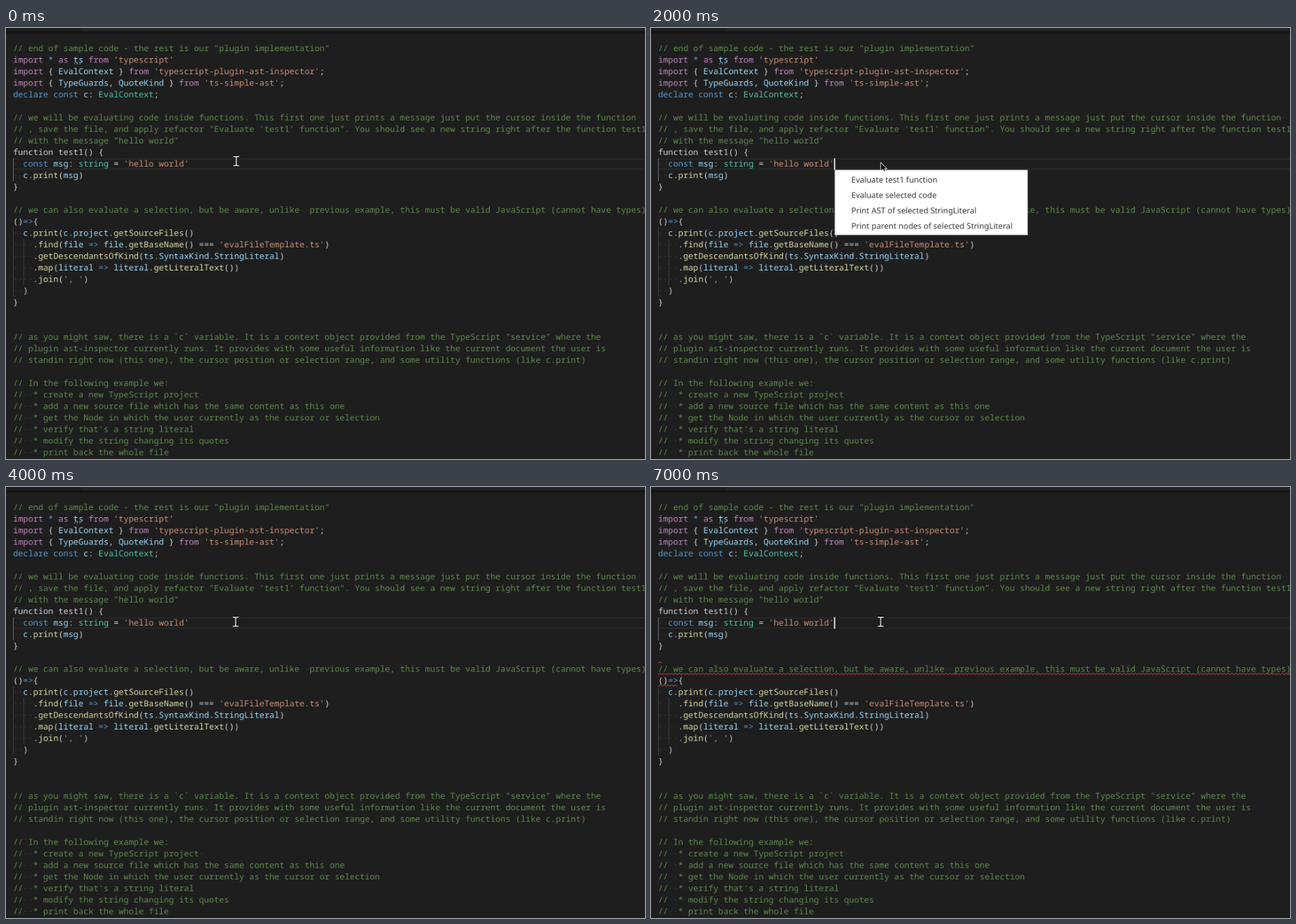
An HTML page with a canvas for the animation above (8 s loop, 910 by 615 pixels).

```html
<!DOCTYPE html>
<html lang="en">
<head>
<meta charset="utf-8">
<title>Evaluating code in the editor</title>
<style>
  html, body { margin: 0; width: 100%; height: 100%; overflow: hidden; background: #1e1e1e; }
  canvas { display: block; }
</style>
</head>
<body>
<canvas id="stage" width="910" height="615"></canvas>
<script>
// The screen is laid out at its natural size, then shrunk onto the stage.
const stage = document.getElementById('stage');
const view = stage.getContext('2d');
const screen = document.createElement('canvas');
const W = screen.width = 992, H = screen.height = 672;
const ctx = screen.getContext('2d');

const LOOP = 8000;
const LEFT = 11, TOP = 23, COL = 7.8, ROW = 18, BASELINE = 13;
const CODE_FONT = '13px "Noto Sans Mono", "DejaVu Sans Mono", monospace';
const MENU_FONT = '12.45px "Noto Sans", "Open Sans", sans-serif';

const code = `// end of sample code - the rest is our "plugin implementation"
import * as ts from 'typescript'
import { EvalContext } from 'typescript-plugin-ast-inspector';
import { TypeGuards, QuoteKind } from 'ts-simple-ast';
declare const c: EvalContext;

// we will be evaluating code inside functions. This first one just prints a message just put the cursor inside the function\x20
// , save the file, and apply refactor "Evaluate 'test1' function". You should see a new string right after the function test1
// with the message "hello world"
function test1() {
  const msg: string = 'hello world'
  c.print(msg)
}

// we can also evaluate a selection, but be aware, unlike  previous example, this must be valid JavaScript (cannot have types)
()=>{
  c.print(c.project.getSourceFiles()
    .find(file => file.getBaseName() === 'evalFileTemplate.ts')
    .getDescendantsOfKind(ts.SyntaxKind.StringLiteral)
    .map(literal => literal.getLiteralText())
    .join(', ')
  )
}


// as you might saw, there is a \`c\` variable. It is a context object provided from the TypeScript "service" where the
// plugin ast-inspector currently runs. It provides with some useful information like the current document the user is
// standin right now (this one), the cursor position or selection range, and some utility functions (like c.print)

// In the following example we:
//  * create a new TypeScript project\x20
//  * add a new source file which has the same content as this one
//  * get the Node in which the user currently as the cursor or selection
//  * verify that's a string literal
//  * modify the string changing its quotes
//  * print back the whole file`.split('\n');

const output = ['var __output = `', 'Output:', 'hello world', '', '`'];
const menuItems = [
  'Evaluate test1 function',
  'Evaluate selected code',
  'Print AST of selected StringLiteral',
  'Print parent nodes of selected StringLiteral'
];

const colors = {
  comment: '#608b4e', string: '#ce9178', type: '#4ec9b0', control: '#c586c0',
  keyword: '#569cd6', plain: '#d4d4d4', method: '#dcdcaa', name: '#9cdcfe', rest: '#d4d4d4'
};
const syntax = new RegExp([
  '(?<comment>^//.*)', "(?<string>'[^']*'|`)", '(?<type>(?<=: )\\w+)',
  '(?<control>\\b(?:import|from|as)\\b)', '(?<keyword>\\b(?:const|declare|var)\\b|=>|\\*)',
  '(?<plain>^function.*)', '(?<method>\\w+(?=\\())', '(?<name>\\w+)', '(?<rest>[^\\s\\w])'
].join('|'), 'g');

const xAt = col => LEFT + col * COL;
const yAt = row => TOP + row * ROW;

function rect(x, y, w, h, color) {
  ctx.fillStyle = color;
  ctx.fillRect(x, y, w, h);
}

// Words sit on the character grid.
function words(text, col, row, color) {
  ctx.fillStyle = color;
  for (const m of text.matchAll(/\S+/g)) ctx.fillText(m[0], xAt(col + m.index), yAt(row) + BASELINE);
}

function codeLine(text, row) {
  for (const m of text.matchAll(syntax)) {
    const kind = Object.keys(m.groups).find(k => m.groups[k] !== undefined);
    words(m[0], m.index, row, colors[kind]);
  }
  for (const m of text.matchAll(/^ +| {2,}| +$/g))
    for (let i = 0; i < m[0].length; i++)
      rect(xAt(m.index + i + 0.5) - 0.75, yAt(row) + 8, 1.5, 1.5, 'rgba(227,228,226,.16)');
}

function guide(col, from, to, color) {
  rect(Math.round(xAt(col)), yAt(from), 1, (to - from) * ROW, color);
}

function squiggle(row, cols) {
  const end = Math.min(W, xAt(cols)), y = yAt(row + 1) - 1.5;
  ctx.beginPath();
  for (let x = LEFT, i = 0; x <= end; x += 3, i++) ctx.lineTo(x, y + (i % 2 ? -1.1 : 1.1));
  ctx.strokeStyle = '#e04444';
  ctx.lineWidth = 1;
  ctx.stroke();
}

function frameTop() {
  rect(117, 0, W - 117, 5, '#252526');
  const shade = ctx.createLinearGradient(0, 5, 0, 11);
  shade.addColorStop(0, 'rgba(0,0,0,.45)');
  shade.addColorStop(1, 'rgba(0,0,0,0)');
  rect(0, 5, W, 6, shade);
}

function editor(s) {
  rect(0, 0, W, H, '#1e1e1e');
  frameTop();
  rect(LEFT, yAt(10), W, 2, '#282828');
  rect(LEFT, yAt(11) - 2, W, 2, '#282828');

  const shift = s.output ? output.length : 0;
  guide(0, 10, 12, '#707070');
  guide(0, 16 + shift, 22 + shift, '#404040');
  guide(2, 17 + shift, 21 + shift, '#404040');

  ctx.font = CODE_FONT;
  code.forEach((text, i) => codeLine(text, i > 12 ? i + shift : i));
  if (s.output) output.forEach((text, i) => {
    if (i === 1 || i === 2) words(text, 0, 13 + i, colors.string);
    else codeLine(text, 13 + i);
  });

  for (let i = 0; i < 3; i++) rect(106 + i * 4, 55, 1.5, 1.5, '#b4b4b4');
  if (s.errors) {
    squiggle(13, 1);
    squiggle(14, 126);
    squiggle(15, 4);
  }
  if (s.caret) rect(xAt(35), yAt(10), 2, ROW, '#e8e8e8');
}

function menu(active) {
  const x = 285, y = 221, w = 300, h = 102, item = 24;
  rect(x, y, w, h, '#b9bbbc');
  rect(x + 1, y + 1, w - 2, h - 2, '#ffffff');
  if (active >= 0) rect(x + 1, y + 3 + active * item, w - 2, item, '#16a085');
  ctx.font = MENU_FONT;
  menuItems.forEach((text, i) => {
    ctx.fillStyle = i === active ? '#ffffff' : '#31363b';
    ctx.fillText(text, x + 26, y + 20 + i * item);
  });
}

function outline(path, color, width) {
  ctx.strokeStyle = color;
  ctx.lineWidth = width;
  ctx.stroke(path);
}

const beam = new Path2D('M-4.5-7h3q1.5 0 1.5 1.5q0-1.5 1.5-1.5h3M0-5.5V5.5M-4.5 7h3q1.5 0 1.5-1.5q0 1.5 1.5 1.5h3');
const arrow = new Path2D('M0 0V13.5L3.5 10.7L5.5 14.5L7.6 13.5L5.8 9.8H9.8Z');

function pointer(x, y, isArrow) {
  ctx.save();
  ctx.translate(x, y);
  if (isArrow) {
    ctx.fillStyle = '#000';
    ctx.fill(arrow);
    outline(arrow, '#fff', 1);
  } else {
    outline(beam, '#000', 3.5);
    outline(beam, '#fff', 1.6);
  }
  ctx.restore();
}

// Each state holds until the next one begins.
const states = [
  { at: 0, mouse: [357.5, 207.5] },
  { at: 1000, mouse: [355.5, 209.5] },
  { at: 2000, mouse: [356.5, 209.5], menu: -1 },
  { at: 3000, mouse: [356.5, 209.5], menu: 0 },
  { at: 4000, mouse: [356.5, 210] },
  { at: 6000, mouse: [356.5, 210], output: true },
  { at: 7000, mouse: [356.5, 210], errors: true }
];
for (const s of states) s.caret = (s.at >= 1000 && s.at < 4000) || s.at >= 7000;

ctx.textRendering = 'geometricPrecision';
const start = performance.now();
let shown;

function draw() {
  const t = Math.max(0, performance.now() - start) % LOOP;
  const s = states.findLast(state => t >= state.at);
  if (s !== shown) {
    const hasMenu = s.menu !== undefined;
    editor(s);
    if (hasMenu) menu(s.menu);
    pointer(...s.mouse, hasMenu);
    view.drawImage(screen, 0, 0, stage.width, stage.height);
    shown = s;
  }
  requestAnimationFrame(draw);
}
draw();
</script>
</body>
</html>
```
